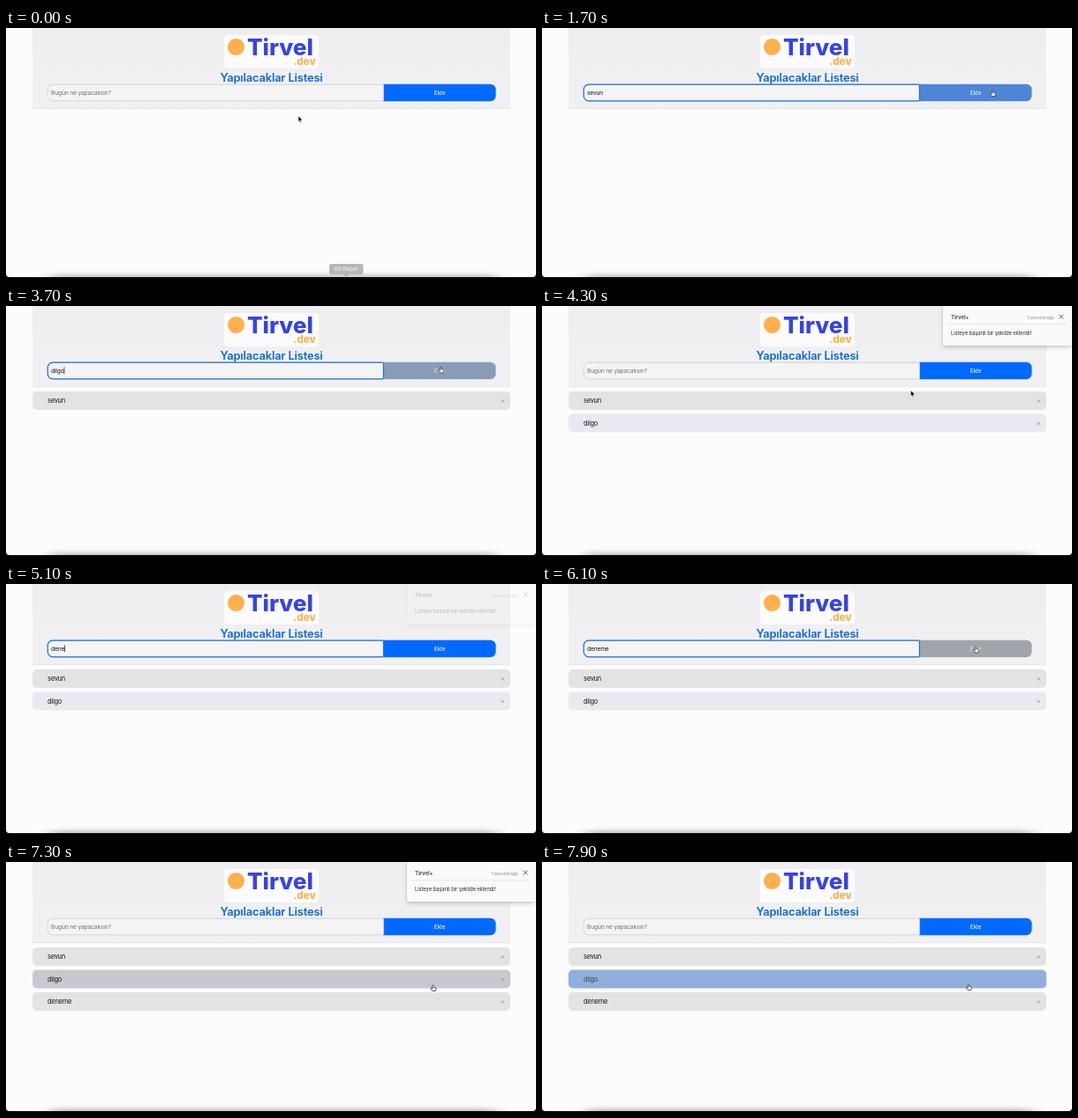
Write an HTML page that moves like this. It is 600 px wide and 284 px high and loops after 8000 ms.

```html
<!DOCTYPE html>
<html lang="tr">
<head>
<meta charset="utf-8">
<title>Yapılacaklar Listesi</title>
<style>
  html, body { margin: 0; width: 100%; height: 100%; overflow: hidden; background: #fcfcfc; }
  svg { display: block; width: 100vw; height: 100vh; }
  text { font-family: Inter, Roboto, "Liberation Sans", sans-serif; white-space: pre; }
  .field { font-size: 6.7px; letter-spacing: -.17px; }
  .item text { font-size: 7.4px; letter-spacing: -.2px; fill: #141414; }
  .cross { stroke: #8a8a8a; stroke-width: .7; fill: none; }
</style>
</head>
<body>
<svg viewBox="0 0 600 284" preserveAspectRatio="none">
  <defs>
    <filter id="blur" x="-10%" y="-300%" width="120%" height="700%"><feGaussianBlur stdDeviation="9 3.5"/></filter>
    <filter id="shade" x="-10%" y="-20%" width="120%" height="160%">
      <feDropShadow dx="0" dy="2" stdDeviation="2.5" flood-color="#000" flood-opacity=".22"/>
    </filter>
    <linearGradient id="head" x1="0" y1="0" x2="0" y2="1">
      <stop offset="0" stop-color="#eeeef0"/><stop offset="1" stop-color="#f1f1f3"/>
    </linearGradient>
  </defs>
  <rect width="600" height="284" fill="#fcfcfc"/>
  <rect x="30" width="541" height="92" fill="url(#head)"/>
  <rect x="30" y="91.3" width="541" height=".8" fill="#e3e3e6"/>

  <rect x="247" y="8" width="107" height="38" rx="4" fill="#fbfbfc"/>
  <circle cx="260.5" cy="21.5" r="9.5" fill="#fdb04b"/>
  <text x="273" y="31" font-size="26" font-weight="800" fill="#3543e4">Tirvel</text>
  <text x="350.5" y="41.5" font-size="11.5" font-weight="800" fill="#fdb04b" text-anchor="end">.dev</text>
  <text x="300.5" y="60.7" font-size="12.8" font-weight="600" letter-spacing="-.12" fill="#0a67d8" text-anchor="middle">Yapılacaklar Listesi</text>

  <path id="button" d="M427.3 63.7H548.3a6.2 6.2 0 0 1 6.2 6.2V77.1a6.2 6.2 0 0 1-6.2 6.2H427.3Z"/>
  <text id="label" class="field" x="491" y="75.9" text-anchor="middle">Ekle</text>
  <path id="input" d="M426.2 64.2a1.2 1.2 0 0 1 1.2 1.2V81.6a1.2 1.2 0 0 1-1.2 1.2H53a5.8 5.8 0 0 1-5.8-5.8V70a5.8 5.8 0 0 1 5.8-5.8Z" fill="#f4f4f5"/>
  <text id="value" class="field" x="51" y="75.9"></text>
  <rect id="caret" y="69.3" width=".7" height="8" fill="#111"/>

  <g id="list"></g>

  <rect x="50" y="282" width="505" height="8" opacity=".38" filter="url(#blur)"/>
  <path d="M0 279.5Q.3 283 4 283H596Q599.7 283 600 279.5V284H0Z"/>

  <g id="tip">
    <path d="M368 268H402.5a2 2 0 0 1 2 2V278a2 2 0 0 1-2 2H388.5L385.3 283.5L382 280H368a2 2 0 0 1-2-2V270a2 2 0 0 1 2-2Z" fill="#b6b6b6"/>
    <text x="385.2" y="276.2" font-size="6" font-weight="500" fill="#f1f1f1" text-anchor="middle">Kit Depot</text>
  </g>

  <g id="toast">
    <rect x="454" y="-3" width="145.5" height="47.8" rx="2.5" fill="#fafafa" filter="url(#shade)"/>
    <rect x="458.5" y="20.5" width="136.5" height=".7" fill="#dedede"/>
    <text x="463" y="15" font-size="6" font-weight="700" letter-spacing="-.05" fill="#4c5055">Tirvel+</text>
    <text x="580" y="14.8" font-size="5.2" letter-spacing="-.1" fill="#85898d" text-anchor="end">1 second ago</text>
    <path d="M585.5 9.5l5 5m0-5l-5 5" stroke="#555" stroke-width=".8"/>
    <text x="463" y="33" font-size="5.9" letter-spacing="-.1" fill="#2b2e31">Listeye başarılı bir şekilde eklendi!</text>
  </g>

  <g id="pointer" stroke-linejoin="round" stroke-linecap="round">
    <path data-kind="arrow" d="M0 0V6.5L1.5 5.2L2.5 7.5L3.5 7L2.5 4.8L4.6 4.7Z" fill="#000" stroke="#fff" stroke-width=".5"/>
    <path data-kind="beam" d="M-1.5-3.2Q0-3.2 0-2.2Q0-3.2 1.5-3.2M0-2.2V2.2M-1.5 3.2Q0 3.2 0 2.2Q0 3.2 1.5 3.2M-.7.8H.7" fill="none" stroke="#222" stroke-width=".8"/>
    <path data-kind="hand" d="M-.8.6Q0-.4.7.6V2.7L2.6 3.1Q3.6 3.4 3.4 4.5L2.8 7H-.9L-2.7 4.4Q-2.6 3.3-1.6 3.8L-.8 4.4Z" fill="#fff" stroke="#222" stroke-width=".7"/>
  </g>
</svg>
<script>
const LOOP = 8000, STEP = 100;
const $ = id => document.getElementById(id);

// Each entry: focus time, first key, ms per key, time it is added, row colour.
const entries = [
  { word: 'sevun', focus: 700, key: 900, pace: 75, add: 1900, fill: [227, 227, 227] },
  { word: 'dilgo', focus: 2400, key: 2800, pace: 150, add: 3900, fill: [234, 233, 241] },
  { word: 'deneme', focus: 4400, key: 4800, pace: 100, add: 6300, fill: [227, 227, 227] }
];
const hidden = [[900, 1300], [2700, 3300], [4800, 5400]];

const path = [
  [200, 331, 100], [600, 296, 72], [1300, 290, 72], [1500, 470, 74], [1700, 510, 70.5],
  [1900, 510, 70.5], [2100, 440, 121], [2300, 371, 70.5], [3300, 371, 72], [3450, 415, 92],
  [3700, 492, 69], [3900, 492, 69], [4200, 440, 120], [4400, 395, 72], [4600, 395, 72],
  [4700, 392, 120], [5400, 392, 120], [5700, 470, 80], [5900, 491, 71], [6300, 491, 71],
  [6600, 486, 147], [6800, 483.5, 139.5], [7300, 483.5, 139.5], [7500, 483, 138.5]
];
const buttonHover = [
  [1500, 0], [1700, .48], [1900, .9], [2000, .8], [2300, 0], [3500, 0], [3700, .85],
  [3900, 1], [4300, 0], [5700, 0], [6000, 1], [6300, 1], [6600, 0]
];
const rowHover = [[6500, 0], [6850, 1]];
const rowDone = [[7500, 0], [8000, .62]];

const BLUE = [0, 105, 255], GREY = [160, 165, 172], HOVER = [201, 200, 208], DONE = [86, 150, 232];

const clamp = v => Math.max(0, Math.min(1, v));
const mix = (a, b, p) => a.map((v, i) => v + (b[i] - v) * p);
const rgb = c => `rgb(${c.map(Math.round)})`;
const within = (t, [a, b]) => t >= a && t < b;

// Linear value(s) of a [time, ...values] table.
function at(table, t) {
  const i = table.findIndex(row => row[0] > t);
  if (i < 0) return table[table.length - 1].slice(1);
  if (i === 0) return table[0].slice(1);
  const [t0, ...a] = table[i - 1], [t1, ...b] = table[i];
  return mix(a, b, (t - t0) / (t1 - t0));
}

const rowTop = i => 97 + i * 25.5;
$('list').innerHTML = entries.map((e, i) => `
  <g class="item" transform="translate(0 ${rowTop(i)})">
    <rect x="30" width="541" height="21" rx="5"/>
    <text x="47" y="13.2">${e.word}</text>
    <path class="cross" d="M560.6 9.3l3.2 3.2m0-3.2l-3.2 3.2"/>
  </g>`).join('');
const rows = [...document.querySelectorAll('.item')];
const shapes = [...$('pointer').children];

function pointerKind(x, y, t) {
  if (y > 64 && y < 83 && x > 47 && x < 554) return x < 427 ? 'beam' : 'hand';
  const onRow = entries.some((e, i) => t >= e.add && y > rowTop(i) && y < rowTop(i) + 21);
  return onRow ? 'hand' : 'arrow';
}

function drawField(t) {
  const e = entries.find(e => within(t, [e.focus, e.add]));
  const count = e ? Math.max(0, Math.min(e.word.length, Math.floor((t - e.key) / e.pace) + 1)) : 0;
  const value = $('value');
  value.textContent = count ? e.word.slice(0, count) : 'Bugün ne yapacaksın?';
  value.setAttribute('fill', count ? '#111' : '#707070');
  $('input').setAttribute('stroke', e ? '#1a6ace' : '#c9c9cc');
  $('input').setAttribute('stroke-width', e ? 1.2 : .7);

  let lit = false;
  if (e) {
    const lastKey = e.key + (e.word.length - 1) * e.pace;
    const since = t < e.key ? t - e.focus : Math.max(0, t - lastKey);
    lit = since % 1000 < 500;
  }
  $('caret').setAttribute('x', 51 + (count ? value.getComputedTextLength() : 0));
  $('caret').style.opacity = lit ? 1 : 0;
}

function drawRows(t) {
  const [hover] = at(rowHover, t), [done] = at(rowDone, t);
  rows.forEach((row, i) => {
    row.style.display = t >= entries[i].add ? '' : 'none';
    const touched = i === 1;
    const fill = touched ? mix(mix(entries[i].fill, HOVER, hover), DONE, done) : entries[i].fill;
    row.children[0].setAttribute('fill', rgb(fill));
    if (touched) {
      row.children[1].style.fill = rgb(mix([20, 20, 20], [120, 120, 120], done));
      row.children[2].style.opacity = 1 - done;
    }
  });
}

function drawPointer(t) {
  const [x, y] = at(path, t);
  const kind = pointerKind(x, y, t);
  $('pointer').setAttribute('transform', `translate(${x} ${y})`);
  $('pointer').style.display = hidden.some(h => within(t, h)) ? 'none' : '';
  shapes.forEach(s => { s.style.display = s.dataset.kind === kind ? '' : 'none'; });
}

function toastOpacity(t) {
  return Math.max(...entries.map(({ add }) =>
    Math.min(clamp((t - add) / 150), clamp(1 - (t - add - 1050) / 200))));
}

function draw(t) {
  const [press] = at(buttonHover, t);
  $('button').setAttribute('fill', rgb(mix(BLUE, GREY, press)));
  $('label').setAttribute('fill', rgb(mix([255, 255, 255], [215, 220, 228], press)));
  $('tip').style.opacity = clamp(1 - t / 300);
  $('toast').style.opacity = toastOpacity(t);
  drawField(t);
  drawRows(t);
  drawPointer(t);
}

const start = performance.now();
function frame(now) {
  const t = Math.max(0, now - start) % LOOP;
  draw(Math.floor(t / STEP) * STEP);
  requestAnimationFrame(frame);
}
draw(0);
requestAnimationFrame(frame);
</script>
</body>
</html>
```
